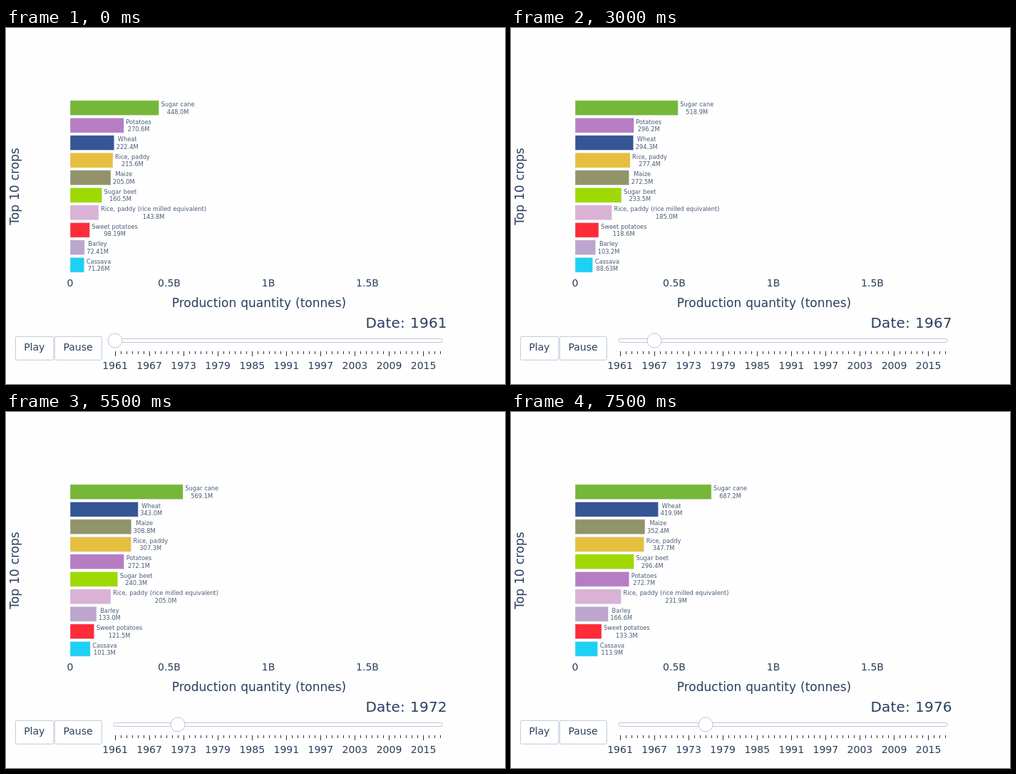
Animation of 700 by 500 pixels, one loop 8 s. Source, as an HTML page:

```html
<!DOCTYPE html>
<html lang="en">
<head>
<meta charset="utf-8">
<title>Top 10 crops</title>
<style>
  html, body { margin: 0; width: 100%; height: 100%; overflow: hidden; background: #fefefe; }
  svg { display: block; width: 700px; height: 500px; }
  text { font: 14px "DejaVu Sans", sans-serif; fill: #2a3f5f; word-spacing: .034em; text-anchor: middle; }
  .title { font-size: 17px; }
  .date { font-size: 20px; letter-spacing: .17px; text-anchor: start; }
  .label text { font-size: 8.25px; fill-opacity: .85; }
  .bar { stroke: #e5ecf6; stroke-width: .5; }
  .control { fill: #fff; stroke: #bec8d9; }
  .tick { stroke: #333; }
</style>
</head>
<body>
<svg id="stage" viewBox="0 0 700 500"></svg>
<script>
const FIRST_YEAR = 1961, LAST_YEAR = 2018, STEP_MS = 500, STEPS = 16;
const LEFT = 90, PX_PER_MILLION = 0.278, ROW = 24.5, BAR = 20.8;
const SLIDER_X = 153, SLIDER_STEP = 8.01;

// Million tonnes per year; gaps are interpolated.
const rice = [215.6, 226.6, 247.1, 263.1, 254.1, 261.3, 277.4, 288.8, 295.5, 316.3, 317.7, 307.3, 334.9, 332.0, 357.0, 347.7];
const crops = [
  ['Sugar cane', '#75b737', [448.0, 447.5, 439.9, 482, 529.5, 529, 518.9, 524, 541, 608.6, 582, 569.1, 612, 648.5, 653, 687.2]],
  ['Potatoes', '#b77dc3', [270.6, 253.1, 270.0, 284.7, 271.6, 287.1, 296.2, 309.9, 278.2, 298.0, 285.3, 272.1, 300.9, 284.8, 276.4, 272.7]],
  ['Wheat', '#355594', [222.4, 250.3, 233.3, 268.7, 263.6, 303.0, 294.3, 327.2, 308.5, 310.7, 347.5, 343.0, 366.1, 358.8, 355.8, 419.9]],
  ['Rice, paddy', '#e5bf3d', rice],
  ['Maize', '#92936b', [205.0, 204.9, 220.2, 215.3, 226.6, 245.6, 272.5, 255.9, 269.8, 265.8, 313.6, 308.8, 317.8, 306.4, 341.8, 352.4]],
  ['Sugar beet', '#9fd903', [160.5, 151.9, 165.0, 198.7, 190.5, 207.6, 233.5, 240, 217.5, 224.3, 226.5, 240.3, 239, 234.9, 250.6, 296.4]],
  ['Rice, paddy (rice milled equivalent)', '#d9b2d6', rice.map(v => v * 0.667)],
  ['Sweet potatoes', '#fe2b38', [98.19, , 98.01, , , , 118.6, , , 136.5, , 121.5, , 137.3, , 133.3]],
  ['Barley', '#bca6cd', [72.41, 83.0, 90.39, 95, 93.1, 102.5, 103.2, 111, 118, 119.4, 131.2, 133.0, 148.7, 148.8, 137.4, 166.6]],
  ['Cassava', '#1ed0f5', [71.26, , 77.98, , , , 88.63, , , 98.59, , 101.3, , 104.4, , 113.9]]
];

const stage = document.getElementById('stage');

function add(tag, attrs, text = '', parent = stage) {
  const node = document.createElementNS('http://www.w3.org/2000/svg', tag);
  set(node, attrs);
  node.textContent = text;
  return parent.appendChild(node);
}

function set(node, attrs) {
  for (const key in attrs) node.setAttribute(key, attrs[key]);
}

function valueAt(values, i) {
  if (i in values) return values[i];
  let a = i, b = i;
  while (!(a in values)) a--;
  while (!(b in values)) b++;
  return values[a] + (values[b] - values[a]) * (i - a) / (b - a);
}

const rows = crops.map(([name, color, values]) => {
  const bar = add('rect', { class: 'bar', x: LEFT, height: BAR, fill: color });
  const label = add('g', { class: 'label' });
  const title = add('text', { y: -2.2 }, name, label);
  const amount = add('text', { y: 8.5 }, '', label);
  return { values, bar, label, title, amount };
});

['0', '0.5B', '1B', '1.5B'].forEach((s, i) => add('text', { x: LEFT + i * 139, y: 363 }, s));
add('text', { class: 'title', x: 355, y: 392 }, 'Production quantity (tonnes)');
add('text', { class: 'title', transform: 'translate(17.5 222.5) rotate(-90)' }, 'Top 10 crops');

[['Play', 13, 53.5], ['Pause', 68, 66]].forEach(([s, x, width]) => {
  add('rect', { class: 'control', x: x + .3, y: 433.3, width, height: 33, rx: 2 });
  add('text', { x: x + width / 2, y: 453 }, s);
});

add('rect', { class: 'control', x: 151, y: 436.5, width: 461, height: 5, rx: 2 });
for (let year = FIRST_YEAR; year <= LAST_YEAR; year++) {
  const n = year - FIRST_YEAR, x = SLIDER_X + n * SLIDER_STEP, major = n % 6 === 0;
  const tickX = Math.floor(x) + .5;
  add('line', { class: 'tick', x1: tickX, x2: tickX, y1: 454, y2: major ? 461 : 458 });
  if (major) add('text', { x, y: 479 }, year);
}
const grip = add('circle', { class: 'control', cy: 439, r: 10 });
const date = add('text', { class: 'date', x: 504.5, y: 421 });

function draw(ms) {
  const step = Math.floor(ms / STEP_MS) % STEPS;
  rows.map(row => ({ ...row, value: valueAt(row.values, step) }))
    .sort((a, b) => b.value - a.value)
    .forEach(({ bar, label, title, amount, value }, i) => {
      const width = value * PX_PER_MILLION, middle = 100 + ROW * (i + .5);
      set(bar, { y: middle - BAR / 2, width });
      amount.textContent = value.toPrecision(4) + 'M';
      const half = Math.max(title.getComputedTextLength(), amount.getComputedTextLength()) / 2;
      set(label, { transform: `translate(${LEFT + width + 3 + half} ${middle})` });
    });
  grip.setAttribute('cx', SLIDER_X + step * SLIDER_STEP);
  date.textContent = 'Date: ' + (FIRST_YEAR + step);
}

let start;
function tick(now) {
  start ??= now;
  draw(now - start);
  requestAnimationFrame(tick);
}
draw(0);
requestAnimationFrame(tick);
</script>
</body>
</html>
```
